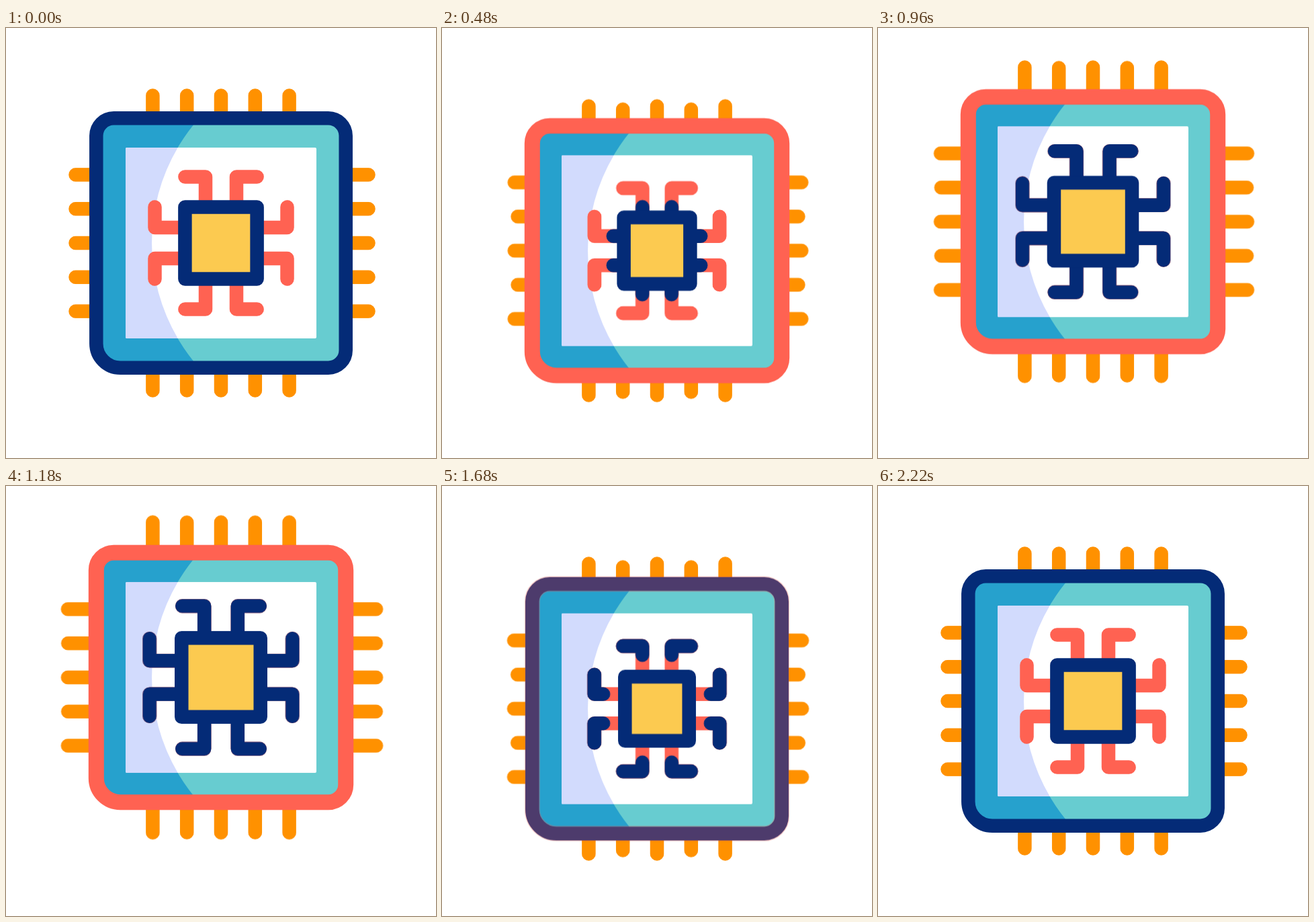
These frames come from a looping animation (640 by 640 pixels, 2800 ms). An HTML page without scripts:

```html
<!DOCTYPE html>
<html lang="en">
<head>
<meta charset="utf-8">
<title>Processor chip</title>
<style>
  html, body { margin: 0; width: 100%; height: 100%; overflow: hidden; background: #fff; }
  svg { display: block; width: 100%; height: 100%; }

  .chip, .pin, .core, .traces, .signal, .glow {
    animation: 2.8s cubic-bezier(.33, 0, .67, 1) infinite;
  }
  .chip { animation-name: hop; }
  .pin { animation-name: stretch; }
  /* 80 ms behind, already running at load */
  .late { animation-delay: -2720ms; }
  .core { animation-name: pulse; }
  .traces { animation-name: swell; }
  .signal { animation-name: flow; stroke-dasharray: 80 200; stroke-dashoffset: 80; }
  .glow { animation-name: glow; animation-timing-function: linear; opacity: 0; }

  .line { fill: none; stroke-linecap: round; stroke-linejoin: round; }
  .odd { d: path("M-101.6-180V-219.4M0-180V-219.4M101.6-180V-219.4"); }
  .even { d: path("M-50.8-180V-219.4M50.8-180V-219.4"); }

  @keyframes hop {
    0%, 7.14% { transform: translateY(0); }
    12.86% { transform: translateY(27px); animation-timing-function: cubic-bezier(.19, 0, .045, 1); }
    46.43% { transform: translateY(-35.5px); }
    55.71% { transform: translateY(27px); }
    66.07% { transform: translateY(-14px); }
    72.86% { transform: translateY(3px); }
    79.29%, 100% { transform: translateY(0); }
  }
  @keyframes stretch {
    0%, 7.14% { transform: translateY(0); }
    12.86% { transform: translateY(9.6px); animation-timing-function: cubic-bezier(.19, 0, .045, 1); }
    46.43% { transform: translateY(-11.7px); }
    55.71% { transform: translateY(9.6px); }
    66.07% { transform: translateY(-6.5px); }
    71.43% { transform: translateY(1.2px); }
    76.43%, 100% { transform: translateY(0); }
  }
  @keyframes pulse {
    0%, 7.14% { x: -53.6px; y: -53.6px; width: 107.2px; height: 107.2px; }
    12.86% {
      x: -46.25px; y: -46.25px; width: 92.5px; height: 92.5px;
      animation-timing-function: cubic-bezier(.19, 0, .045, 1);
    }
    46.43% { x: -58.8px; y: -58.8px; width: 117.6px; height: 117.6px; }
    56.43% { x: -44px; y: -44px; width: 88px; height: 88px; }
    66.07% { x: -55.7px; y: -55.7px; width: 111.4px; height: 111.4px; }
    72.86% { x: -53px; y: -53px; width: 106px; height: 106px; }
    79.29%, 100% { x: -53.6px; y: -53.6px; width: 107.2px; height: 107.2px; }
  }
  /* stroke width counters the scale so the lines keep their weight */
  @keyframes swell {
    0%, 10% { transform: scale(1); stroke-width: 20.5px; }
    15.71% {
      transform: scale(.942); stroke-width: 21.8px;
      animation-timing-function: cubic-bezier(.19, 0, .045, 1);
    }
    49.29% { transform: scale(1.081); stroke-width: 19px; }
    58.57% { transform: scale(.942); stroke-width: 21.8px; }
    68.93% { transform: scale(1.035); stroke-width: 19.8px; }
    74.29% { transform: scale(.993); stroke-width: 20.6px; }
    79.29%, 100% { transform: scale(1); stroke-width: 20.5px; }
  }
  @keyframes flow {
    0%, 11.79% { stroke-dashoffset: 80; }
    31.07%, 51.89% { stroke-dashoffset: 0; }
    71.18%, 100% { stroke-dashoffset: -80; }
  }
  @keyframes glow {
    0%, 8.57% { opacity: 0; }
    15.71%, 55% { opacity: 1; }
    62.14%, 100% { opacity: 0; }
  }
</style>
</head>
<body>
<svg viewBox="0 0 640 640">
  <defs>
    <path id="pair" d="M-23-53.7V-98.5H-53.6M23-53.7V-98.5H53.6"/>
    <g id="ring">
      <use href="#pair"/>
      <use href="#pair" transform="rotate(90)"/>
      <use href="#pair" transform="rotate(180)"/>
      <use href="#pair" transform="rotate(270)"/>
    </g>
    <path id="case" d="M-159.7-185.7H159.7A26 26 0 0 1 185.7-159.7V159.7A26 26 0 0 1 159.7 185.7H-149.7A36 36 0 0 1-185.7 149.7V-159.7A26 26 0 0 1-159.7-185.7Z"/>
  </defs>

  <g transform="translate(320 320)">
    <g class="chip">
      <g class="line" stroke="#ff9100" stroke-width="20.5">
        <g><path class="pin odd"/><path class="pin even late"/></g>
        <g transform="rotate(90)"><path class="pin odd"/><path class="pin even late"/></g>
        <g transform="rotate(180)"><path class="pin odd"/><path class="pin even late"/></g>
        <g transform="translate(3 0) rotate(270)"><path class="pin odd"/><path class="pin even late"/></g>
      </g>

      <use href="#case" fill="#67ccd0"/>
      <path fill="#26a1cd" d="M-32.6-185.7H-159.7A26 26 0 0 0-185.7-159.7V149.7A36 36 0 0 0-149.7 185.7H-32.6A280 280 0 0 1-32.6-185.7Z"/>
      <rect x="-142" y="-142" width="284" height="284" rx="2" fill="#fff"/>
      <path fill="#d2dbfd" d="M-64.3-142H-140A2 2 0 0 0-142-140V140A2 2 0 0 0-140 142H-64.3A280 280 0 0 1-64.3-142Z"/>

      <use href="#case" fill="none" stroke="#042b77" stroke-width="20.5"/>
      <use href="#case" class="glow" fill="none" stroke="#ff6252" stroke-width="23"/>

      <g class="traces line" stroke-width="20.5">
        <use href="#ring" stroke="#ff6252"/>
        <g class="signal" stroke="#042b77"><use href="#ring"/></g>
      </g>
      <rect class="core" x="-53.6" y="-53.6" width="107.2" height="107.2"
        fill="#fcca50" stroke="#042b77" stroke-width="20.5" stroke-linejoin="round"/>
    </g>
  </g>
</svg>
</body>
</html>
```
